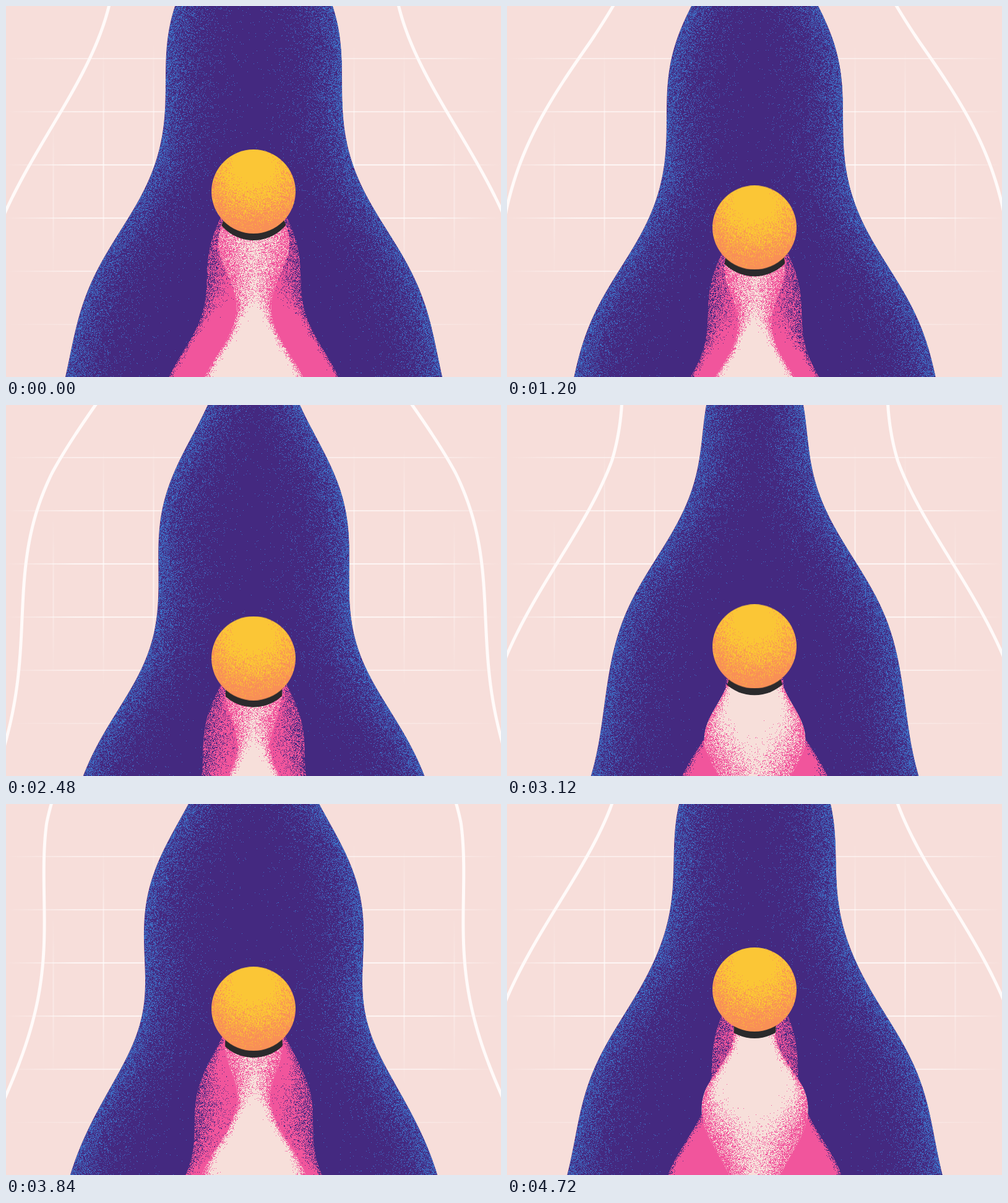
These frames come from a looping animation (800x600 px, 4800 ms). An HTML page with a canvas:

```html
<!DOCTYPE html>
<html lang="en">
<head>
<meta charset="utf-8">
<title>Bouncing ball</title>
<style>
  html, body { margin: 0; width: 100%; height: 100%; overflow: hidden; background: #f7deda; }
  canvas { display: block; width: 100vw; height: 100vh; }
</style>
</head>
<body>
<canvas id="stage" width="800" height="600"></canvas>
<script>
const W = 800, H = 600, MID = 400.5, LOOP = 4800, STEP = 80, R = 68;
const TAU = Math.PI * 2;
const PINK = [241, 85, 156], PURPLE = [68, 41, 128], BLUE = [63, 112, 198], SALMON = [249, 144, 86];
const css = c => `rgb(${c})`;
const clamp = (v, a = 0, b = 1) => Math.min(b, Math.max(a, v));
const ctx = document.getElementById('stage').getContext('2d');

function layer(w, h) {
  const c = document.createElement('canvas');
  c.width = w;
  c.height = h;
  return c;
}

function random(seed) {
  return () => {
    seed = seed + 0x6D2B79F5 | 0;
    let r = Math.imul(seed ^ seed >>> 15, 1 | seed);
    r = r + Math.imul(r ^ r >>> 7, 61 | r) ^ r;
    return ((r ^ r >>> 14) >>> 0) / 4294967296;
  };
}

const rnd = random(7);
const noise = Float32Array.from({ length: W * H }, rnd);

// Half widths at height y (measured with the ball at its top), n = elapsed steps
const bodyWidth = (y, n) => {
  const u = clamp((y + 110) / 750);
  const amp = 29 * Math.sin(Math.PI * u ** 0.75);
  const waist = 6 * Math.exp(-(((y - 320) / 100) ** 2));
  return 109.5 + 0.321 * y - waist + amp * Math.sin(TAU * ((y - 385) / 565 - n / 15));
};

const lineWidth = (y, n) => {
  const amp = 53 - 0.072 * Math.max(0, y);
  return 284 + 0.31 * y + amp * Math.sin(TAU * ((y - 262) / 860 - n / 20));
};

const pinkPhase = (y, n) => TAU * ((y - 580) / 312 - n / 15);
const pinkWidth = (y, n) => {
  const amp = 16 * Math.sin(Math.PI * clamp((y - 300) / 380));
  return 44 + 0.33 * (y - 330) + amp * Math.sin(pinkPhase(y, n));
};

const palePhase = (y, n) => TAU * ((y - 640) / 300 - n * 0.0594);
const paleWidth = (y, n) => {
  const d = y - 360;
  const amp = 29 * Math.sin(clamp((y - 325) / 145) * Math.PI / 2);
  return 44 + Math.min(0.12 * d, 9 + 0.03 * d) + amp * Math.cos(palePhase(y, n));
};

// Shading is deeper below a bulge than above it
const depth = (phase, min, span) => min + span * (0.5 + 0.5 * Math.sin(phase + 0.3)) ** 2;
const falloff = (d, size) => Math.exp(-((d / size) ** 1.5));

function ease(x) {
  let lo = 0, hi = 1;
  for (let i = 0; i < 24; i++) {
    const s = (lo + hi) / 2;
    if (1.5 * s - 1.5 * s * s + s ** 3 < x) lo = s; else hi = s;
  }
  return lo * lo * (3 - 2 * lo);
}

function drop(t) {
  const u = ((t + 36) % LOOP) / (LOOP / 2);
  return 110 * ease(u < 1 ? u : 2 - u);
}

function fade(x0, y0, x1, y1, alpha, edge) {
  const g = ctx.createLinearGradient(x0, y0, x1, y1);
  const white = a => `rgba(255,252,251,${a})`;
  g.addColorStop(0, white(0));
  g.addColorStop(edge, white(alpha));
  g.addColorStop(1 - edge, white(alpha));
  g.addColorStop(1, white(0));
  return g;
}

function drawGrid() {
  [0.5, 0.6, 0.8, 0.75, 0.55, 0.25].forEach((a, i) => {
    const y = 85 + i * 86;
    ctx.fillStyle = fade(0, y, W, y, a, 0.14);
    ctx.fillRect(0, y - 1, W, 2);
  });
  [[324, 0.35, 180, 440], [243, 0.7, 70, 455], [162, 0.65, 60, 455]].forEach(([dx, a, top, bottom]) => {
    ctx.fillStyle = fade(0, top, 0, bottom, a, 0.4);
    for (const x of [MID - dx, MID + dx]) ctx.fillRect(x - 1, top, 2, bottom - top);
  });
}

function shape(width, from, shift, n) {
  const p = new Path2D();
  const top = Math.floor(from);
  for (let y = top; y <= H + 4; y += 2) p.lineTo(MID - width(y - shift, n), y);
  for (let y = H + 4 - (top & 1); y >= top; y -= 2) p.lineTo(MID + width(y - shift, n), y);
  p.closePath();
  return p;
}

function drawLines(shift, n) {
  ctx.strokeStyle = '#fffaf9';
  ctx.lineWidth = 5;
  for (const side of [-1, 1]) {
    ctx.beginPath();
    for (let y = -6; y <= H; y += 3) ctx.lineTo(MID + side * lineWidth(y - shift, n), y);
    ctx.stroke();
  }
}

const grain = layer(W, H), grainCtx = grain.getContext('2d');
const pixels = grainCtx.createImageData(W, H);

function dot(data, i, color) {
  data[i] = color[0];
  data[i + 1] = color[1];
  data[i + 2] = color[2];
  data[i + 3] = 255;
}

function drawGrain(shift, n) {
  const data = pixels.data;
  data.fill(0);
  for (let y = 0; y < H; y++) {
    const v = y + 0.5 - shift;
    const body = bodyWidth(v, n);
    const inner = v > 312;
    const pink = inner ? pinkWidth(v, n) : 0;
    const pale = inner ? paleWidth(v, n) : 0;
    const paleDepth = depth(palePhase(v, n), 5, 40);
    const pinkDepth = depth(pinkPhase(v, n) - Math.PI / 2, 4, 28);
    const end = Math.min(W, MID + body - 0.5);
    for (let x = Math.max(0, Math.ceil(MID - body)); x < end; x++) {
      const a = Math.abs(x + 0.5 - MID);
      let density, color;
      if (a < pale) {
        density = 0.8 * falloff(pale - a, paleDepth);
        color = PINK;
      } else if (a < pink) {
        density = 0.55 * falloff(pink - a, pinkDepth);
        color = PURPLE;
      } else {
        density = 0.62 * Math.exp((a - body) / 30);
        color = BLUE;
      }
      const i = y * W + x;
      if (noise[i] < density) dot(data, i * 4, color);
    }
  }
  grainCtx.putImageData(pixels, 0, 0);
  ctx.drawImage(grain, 0, 0);
}

function makeBall() {
  const size = R * 2;
  const speckle = layer(size, size), sc = speckle.getContext('2d');
  const img = sc.createImageData(size, size);
  for (let y = 0; y < size; y++) {
    for (let x = 0; x < size; x++) {
      const k = clamp((Math.hypot(x - R, y - 24) - 22) / 92);
      if (rnd() < k * k * (3 - 2 * k)) dot(img.data, (y * size + x) * 4, SALMON);
    }
  }
  sc.putImageData(img, 0, 0);
  const ball = layer(size, size), bc = ball.getContext('2d');
  bc.beginPath();
  bc.arc(R, R, R, 0, TAU);
  bc.fillStyle = '#fbc636';
  bc.fill();
  bc.globalCompositeOperation = 'source-atop';
  bc.drawImage(speckle, 0, 0);
  return ball;
}

const ball = makeBall();

function draw(t) {
  const n = t / STEP, shift = drop(t), cy = 300 + shift;
  ctx.fillStyle = '#f7deda';
  ctx.fillRect(0, 0, W, H);
  drawGrid();
  drawLines(shift, n);

  const pale = shape(paleWidth, cy + 12, shift, n);
  ctx.fillStyle = css(PURPLE);
  ctx.fill(shape(bodyWidth, -4, shift, n));
  ctx.fillStyle = css(PINK);
  ctx.fill(shape(pinkWidth, cy + 12, shift, n));
  ctx.fillStyle = '#f7dfda';
  ctx.fill(pale);
  drawGrain(shift, n);

  ctx.save();
  ctx.clip(pale);
  ctx.beginPath();
  ctx.arc(400, cy + 11, R, 0, TAU);
  ctx.fillStyle = '#2b2a2c';
  ctx.fill();
  ctx.restore();
  ctx.drawImage(ball, 400 - R, cy - R);
}

let last = -1;
function tick() {
  const t = Math.floor((performance.now() % LOOP) / STEP) * STEP;
  if (t !== last) draw(last = t);
  requestAnimationFrame(tick);
}
tick();
</script>
</body>
</html>
```
